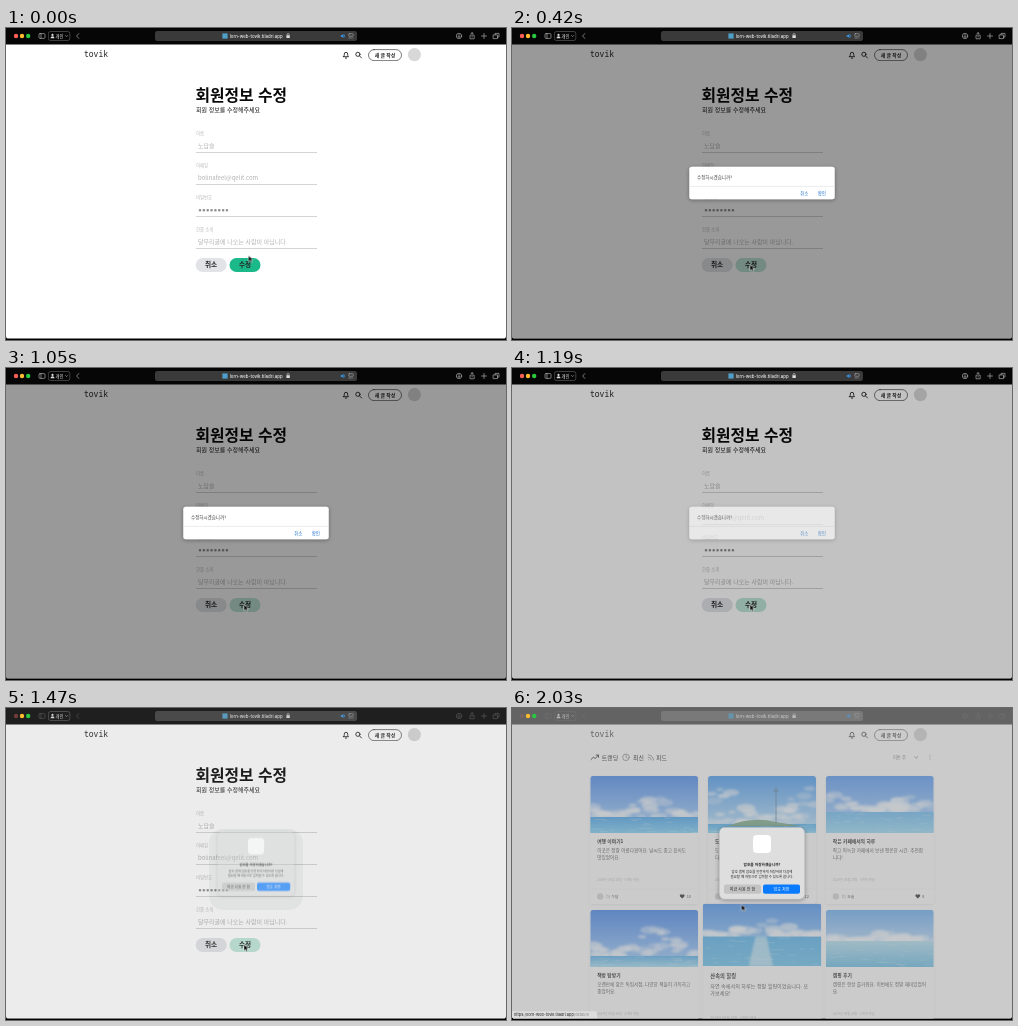
Write an HTML page that moves like this. It is 500 by 312 pixels and loops after 2100 ms.

```html
<!DOCTYPE html>
<html lang="ko">
<head>
<meta charset="utf-8">
<title>회원정보 수정</title>
<style>
  html, body { margin: 0; width: 100%; height: 100%; overflow: hidden; background: #000; }
  svg.stage { display: block; width: 100%; height: 100%; }
  text { font-family: "Noto Sans CJK KR", "Noto Sans CJK", "Noto Sans", sans-serif; fill: #222; white-space: pre; }
  .mid { text-anchor: middle; }
  .b { font-weight: 700; }
  .m { font-weight: 500; }
  .latin { font-family: Inter, "Noto Sans", sans-serif; }
  .logo { font: 500 8px "Noto Sans Mono", "DejaVu Sans Mono", monospace; }
  .label text { font-size: 4.4px; fill: #b9b9b9; }
  .value text { font-size: 6px; fill: #b0b0b0; }
  .line { fill: none; stroke-linecap: round; stroke-linejoin: round; }

  /* 30 ticks of 70 ms; each change sits just before its tick */
  .anim { animation: 2100ms step-end infinite; }
  #cursor { animation-name: cursor; }
  #save { animation-name: hover; }
  #dim { animation-name: dim; }
  #alert { animation-name: alert; }
  #header { animation-name: header; }
  #form { animation-name: form; }
  #feed { animation-name: feed; }
  #lifted { animation-name: lift; transform-origin: 250px 266px; }
  #bar { animation-name: bar; }
  #veil { animation-name: veil; }
  .idle { animation-name: idle; }
  #sheet { animation-name: sheet; transform-origin: 250px 157px; }
  #plate { animation-name: plate; }
  #ghost { animation-name: ghost; }
  #status { animation-name: status; }

  @keyframes cursor {
    0% { transform: translate(242.5px, 227.5px); }
    3.3% { transform: translate(240px, 232.5px); }
    6.6% { transform: translate(238px, 236.5px); }
    83.3% { transform: translate(238px, 236.5px); animation-timing-function: steps(5, start); }
    100% { transform: translate(229.5px, 196.5px); }
  }
  @keyframes hover {
    0% { fill: #1bb889; }
    3.3% { fill: #6dcfb1; }
    6.6%, 100% { fill: #bfe6d8; }
  }
  @keyframes dim {
    0% { opacity: 0; }
    13.3% { opacity: .13; }
    16.6% { opacity: .3; }
    19.9% { opacity: .4; }
    56.6% { opacity: .24; }
    59.9% { opacity: .08; }
    63.3%, 100% { opacity: 0; }
  }
  @keyframes alert {
    0% { opacity: 0; }
    13.3% { opacity: .3; }
    16.6% { opacity: .75; }
    19.9% { opacity: 1; }
    56.6% { opacity: .62; }
    59.9% { opacity: .2; }
    63.3%, 100% { opacity: 0; }
  }
  @keyframes header { 0% { opacity: 1; } 73.3%, 100% { opacity: .8; } }
  @keyframes form { 0% { opacity: 1; } 73.3%, 100% { opacity: 0; } }
  @keyframes feed { 0% { opacity: 0; } 73.3%, 100% { opacity: 1; } }
  @keyframes lift {
    0% { transform: none; }
    73.3% { transform: scale(1.05); }
    76.6%, 100% { transform: scale(1.1); }
  }
  @keyframes bar {
    0% { fill: #060606; }
    69.9% { fill: #0c0c0c; }
    73.3% { fill: #2c2c2c; }
    76.6%, 100% { fill: #4b4b4b; }
  }
  @keyframes veil {
    0% { opacity: 0; }
    66.6% { opacity: .06; }
    69.9% { opacity: .155; }
    73.3% { opacity: .32; }
    76.6%, 100% { opacity: .42; }
  }
  @keyframes idle {
    0% { opacity: 1; }
    66.6% { opacity: .7; }
    69.9% { opacity: .4; }
    73.3% { opacity: .3; }
    76.6%, 100% { opacity: .2; }
  }
  @keyframes sheet {
    0% { opacity: 0; transform: scale(.85); }
    69.9% { opacity: .65; transform: scale(.9); }
    73.3% { opacity: .9; transform: scale(.97); }
    76.6%, 100% { opacity: 1; transform: none; }
  }
  @keyframes plate {
    0% { opacity: .5; }
    73.3% { opacity: .9; }
    76.6%, 100% { opacity: 1; }
  }
  @keyframes ghost {
    0% { opacity: 0; }
    69.9% { opacity: .06; }
    73.3%, 100% { opacity: 0; }
  }
  @keyframes status { 0% { opacity: 0; } 86.6%, 100% { opacity: 1; } }
</style>
</head>
<body>
<svg class="stage" viewBox="0 0 500 312">
  <defs>
    <clipPath id="window"><path d="M0 0H500V308a2.600 2.600 0 0 1-2.600 2.600H2.600a2.600 2.600 0 0 1-2.600-2.600z"/></clipPath>
    <clipPath id="photo"><path d="M0 57V3a3 3 0 0 1 3-3H105a3 3 0 0 1 3 3V57z"/></clipPath>
    <filter id="soft" x="-20%" y="-20%" width="140%" height="150%">
      <feDropShadow dx="0" dy="1" stdDeviation="2" flood-opacity=".35"/>
    </filter>
    <filter id="faint" x="-10%" y="-10%" width="120%" height="120%">
      <feDropShadow dx="0" dy=".6" stdDeviation="1" flood-opacity=".1"/>
    </filter>
    <filter id="haze"><feGaussianBlur stdDeviation=".9"/></filter>
  </defs>

  <rect width="500" height="312"/>

  <g clip-path="url(#window)">
    <rect width="500" height="311" fill="#fff"/>

    <g id="header" class="anim">
      <text class="logo" x="78" y="29.2">tovik</text>
      <g class="line" stroke="#222" stroke-width=".9">
        <path d="M337.5 28.7h5c-.8-.8-.8-1.6-.8-2.7a1.7 1.7 0 0 0-3.4 0c0 1.1 0 1.9-.8 2.7zM339.4 30.1h1.2"/>
        <circle cx="351.9" cy="26.3" r="2.1"/>
        <path d="M353.5 27.9l2 2"/>
        <rect x="362.5" y="21.6" width="33" height="11" rx="5.5" stroke-width=".6"/>
      </g>
      <text class="b mid" x="379" y="28.9" font-size="4.9">새 글 작성</text>
    </g>
    <circle cx="408.4" cy="26.6" r="6.6" fill="#d8d8d8"/>

    <g id="form" class="anim">
      <text class="b" x="189.5" y="72.7" font-size="15.8" style="fill:#080808">회원정보 수정</text>
      <text class="m" x="190" y="84.2" font-size="6" style="fill:#111">회원 정보를 수정해주세요</text>
      <g class="label">
        <text x="190" y="107">이름</text>
        <text x="190" y="139">이메일</text>
        <text x="190" y="171">비밀번호</text>
        <text x="190" y="203">한줄 소개</text>
      </g>
      <g class="value">
        <text x="192" y="120.2">노담슬</text>
        <text x="192" y="152.2">bolinafeel@qelit.com</text>
        <text x="192" y="215.8">달무리골에 나오는 사람이 아닙니다.</text>
      </g>
      <path d="M194 182.2h28" stroke="#8f8f8f" stroke-width="2.6" stroke-linecap="round" stroke-dasharray="0 3.85"/>
      <path d="M190 124.5h121M190 156.5h121M190 188.5h121M190 220.5h121" stroke="#c2c2c2" stroke-width=".7"/>
      <rect x="189.7" y="230" width="31" height="14" rx="7" fill="#e1e3e7"/>
      <rect id="save" class="anim" x="223.5" y="230" width="31" height="14" rx="7"/>
      <text class="b mid" x="205" y="239.4" font-size="6.6">취소</text>
      <text class="b mid" x="239" y="239.4" font-size="6.6">수정</text>
    </g>

    <g id="feed" class="anim">
      <g class="line" stroke="#333" stroke-width=".9">
        <path d="M79 51.5l2.5-2.5 1.6 1.6 3.3-3.5M84.2 47h2.3v2.3"/>
        <g stroke="#777" stroke-width=".7">
          <circle cx="114" cy="49.3" r="3.3"/>
          <path d="M114 47.3v2l1.2.9"/>
          <path d="M136.3 49a3 3 0 0 1 3 3M136.3 46.8a5.2 5.2 0 0 1 5.2 5.2M136.5 51.8h.1"/>
          <path d="M402.7 48.7l1.5 1.5 1.5-1.5"/>
        </g>
        <path d="M418 47.3v.01M418 49.3v.01M418 51.3v.01" stroke="#999"/>
      </g>
      <g font-size="5.9">
        <text class="m" x="89.8" y="51.5">트렌딩</text>
        <text x="121" y="51.5">최신</text>
        <text x="144" y="51.5">피드</text>
      </g>
      <text x="381" y="50.9" font-size="4.2" style="fill:#888">이번 주</text>
      <g id="cards"></g>
    </g>

    <rect id="dim" class="anim" width="500" height="311"/>
    <g id="alert" class="anim">
      <rect x="177.3" y="138.8" width="145.4" height="32.4" rx="2.5" fill="#fff" filter="url(#soft)"/>
      <path d="M177.3 158.4h145.4" stroke="#ddd" stroke-width=".6"/>
      <text x="185" y="150.9" font-size="4.5" style="fill:#444">수정하시겠습니까?</text>
      <g class="mid m" font-size="4.5">
        <text x="292.3" y="166.7" style="fill:#2a78d0">취소</text>
        <text x="309.8" y="166.7" style="fill:#1468cc">확인</text>
      </g>
    </g>

    <g id="toolbar">
      <rect id="bar" class="anim" width="500" height="16.5"/>
      <circle class="anim idle" cx="10" cy="8" r="2.2" fill="#fe5f57"/>
      <g class="line anim idle" stroke="#aaa" stroke-width=".7">
        <rect x="33" y="5.6" width="6" height="4.8" rx="1"/>
        <path d="M35 5.6v4.8M72.8 5.6l-2.2 2.4 2.2 2.4"/>
      </g>
      <rect x="42.4" y="3.5" width="21.4" height="9" rx="2" fill="none" stroke="#666" stroke-width=".6"/>
      <circle cx="46.5" cy="6.9" r="1.1" fill="#ddd"/>
      <path d="M44.5 10.2a2 2 0 0 1 4 0z" fill="#ddd"/>
      <text class="m" x="49.6" y="9.6" font-size="4.3" style="fill:#eee">개인</text>
      <path class="line" d="M59.5 7.5l1.1 1.1 1.1-1.1" stroke="#bbb" stroke-width=".6"/>

      <rect x="149" y="3" width="202" height="10" rx="2.5" fill="#fff" opacity=".21"/>
      <rect x="216.4" y="5.4" width="5.2" height="5.2" fill="#4f9fc8"/>
      <text class="latin m" x="223.7" y="9.6" font-size="4.35" style="fill:#f2f2f2">lorn-web-tovik.tiladri.app</text>
      <rect x="280.4" y="7.3" width="3.4" height="2.8" rx=".5" fill="#ddd"/>
      <path class="line" d="M281.1 7.3v-.8a1 1 0 0 1 2 0v.8" stroke="#ddd" stroke-width=".6"/>
      <path d="M334.7 7.2h1.2l1.5-1.3v4.2l-1.5-1.3h-1.2z" fill="#3b9cf0"/>
      <path class="line" d="M338.3 6.7a1.8 1.8 0 0 1 0 2.6" stroke="#3b9cf0" stroke-width=".6"/>
      <g class="line" stroke="#aaa" stroke-width=".6">
        <rect x="342.8" y="5.7" width="4.4" height="2.6" rx=".5"/>
        <path d="M342.9 10h2.5M346.7 10h.3"/>
      </g>
      <g class="line anim idle" stroke="#aaa" stroke-width=".7">
        <circle cx="453" cy="8" r="2.7"/>
        <path d="M453 6.5v2.8M452 8.4l1 1 1-1"/>
        <path d="M464.9 7.2h-.9v3.6h4.2V7.2h-.9M466.1 9V4.7M465 5.7l1.1-1.1 1.1 1.1"/>
        <path d="M475.5 8h5M478 5.5v5"/>
        <path d="M487.5 6.9h4v3.7h-4zM489 6.9V5.4h4v3.7h-1.5"/>
      </g>
    </g>

    <rect id="veil" class="anim" width="500" height="311" fill="#848484"/>
    <circle cx="16" cy="8" r="2.2" fill="#febc2e"/>
    <circle cx="22.2" cy="8" r="2.2" fill="#28c840"/>

    <g id="status" class="anim">
      <path d="M0 303.2H83a2 2 0 0 1 2 2V311H0z" fill="#dcdcdc"/>
      <text class="latin" x="2" y="308.4" font-size="3.9">https://lorn-web-tovik.tiladri.app<tspan fill="#888">/detail/8</tspan></text>
    </g>
  </g>

  <rect id="ghost" class="anim" x="203" y="121" width="94" height="81" rx="14" fill="#4a5a5a"/>
  <g id="sheet" class="anim">
    <rect id="plate" class="anim" x="207.5" y="119.5" width="85" height="71.5" rx="5" fill="#dedede" stroke="#bbb" stroke-width=".3" filter="url(#soft)"/>
    <rect x="241" y="127" width="18" height="18" rx="4" fill="#fff"/>
    <text class="b mid" x="250" y="157.6" font-size="3.7">암호를 저장하겠습니까?</text>
    <g class="mid" font-size="3.4">
      <text x="250" y="164.8">암호 앱에 암호를 안전하게 저장하여 다음에</text>
      <text x="250" y="169.8">필요할 때 자동으로 입력할 수 있도록 합니다.</text>
    </g>
    <rect x="212" y="176.5" width="37" height="9.2" rx="2" fill="#c3c3c3"/>
    <rect x="251" y="176.5" width="37" height="9.2" rx="2" fill="#0a7bff"/>
    <g class="mid m" font-size="4">
      <text x="230.5" y="182.6">지금 사용 안 함</text>
      <text x="269.5" y="182.6" style="fill:#fff">암호 저장</text>
    </g>
  </g>

  <path id="cursor" class="anim" d="M0 0V6.2l1.5-1.3 1 2.2 1.1-.5-1-2.1h2z" stroke="#fff" stroke-width=".5"/>
</svg>

<script>
  const posts = [
    { title: "여행 이야기1", lines: ["이곳은 정말 아름다웠어요. 날씨도 좋고 음식도", "맛있었어요."],
      by: "누담", likes: 10, sky: ["#4a8cf0", "#b4dcff"], sea: ["#4aa6ee", "#7fd2fa"], shore: 41, bank: 22, extra: "" },
    { title: "도시의 하루", lines: ["도심 골목을 천천히 걸으며 사진을 남겼어요.", "다시 가고 싶어요."],
      by: "마온", likes: 12, sky: ["#4a9cf2", "#c4e8ff"], sea: ["#55b4f0", "#8ad6f8"], shore: 48, bank: 38,
      extra: '<path d="M20 50q24-10 48-4l24 4z" fill="#7fae8c"/><path d="M68 47V11M65 15h6" stroke="#5d7686" stroke-width=".7"/>' },
    { title: "작은 카페에서의 하루", lines: ["작고 아늑한 카페에서 보낸 평온한 시간. 추천합", "니다!"],
      by: "오슬", likes: 8, sky: ["#5a9cf4", "#b8dcff"], sea: ["#70bdf4", "#9adcf8"], shore: 36, bank: 20, extra: "" },
    { title: "책방 탐방기", lines: ["오랜만에 찾은 독립서점, 다양한 책들이 가득하고", "좋았어요."],
      by: "다울", likes: 7, sky: ["#4688ee", "#a8d4ff"], sea: ["#5cb2ee", "#a4e0f6"], shore: 46, bank: 28, extra: "" },
    { title: "산속의 힐링", lines: ["자연 속에서의 하루는 정말 힐링이었습니다. 또", "가보세요!"],
      by: "루온", likes: 9, sky: ["#4e96f0", "#b4e0ff"], sea: ["#58b4ee", "#6cc4ee"], shore: 30, bank: 16,
      extra: '<path d="M48 30h10l6 27H42z" fill="#e6f9ff" opacity=".6" filter="url(#haze)"/>' },
    { title: "캠핑 후기", lines: ["캠핑은 항상 즐거워요. 이번에도 정말 재미있었어", "요."],
      by: "해린", likes: 6, sky: ["#6cb0f4", "#f0f8ff"], sea: ["#b4e2f4", "#6cc0e8"], shore: 31, bank: 9, extra: "" }
  ];

  const random = seed => () => (seed = seed * 16807 % 2147483647) / 2147483647;

  const gradient = (id, [from, to]) =>
    `<linearGradient id="${id}" x2="0" y2="1"><stop stop-color="${from}"/><stop offset="1" stop-color="${to}"/></linearGradient>`;

  function clouds(rand, shore, bank) {
    let out = "";
    for (let i = 0; i < 44; i++) {
      const x = rand() * 108;
      const rise = bank * (.6 + .4 * Math.sin(x / 13 + bank));
      const y = shore - rand() * rise;
      const r = 1.5 + rand() * 2.5;
      out += `<ellipse cx="${x.toFixed(1)}" cy="${y.toFixed(1)}" rx="${(r * 2.4).toFixed(1)}" ry="${r.toFixed(1)}" opacity="${(.3 + rand() * .4).toFixed(2)}"/>`;
    }
    return `<g fill="#f4faff" filter="url(#haze)">${out}</g>`;
  }

  function waves(rand, shore) {
    let d = "";
    for (let i = 0; i < 22; i++) {
      d += `M${(rand() * 104).toFixed(1)} ${(shore + 1 + rand() * (56 - shore)).toFixed(1)}h${(3 + rand() * 8).toFixed(1)}`;
    }
    return `<path d="${d}" stroke="#d8f2fc" stroke-width=".5" opacity=".5"/>`;
  }

  function photo(p, i) {
    const rand = random(977 * (i + 3));
    return `${gradient("sky" + i, p.sky)}${gradient("sea" + i, p.sea)}
      <g clip-path="url(#photo)">
        <rect width="108" height="57" fill="url(#sky${i})"/>
        ${clouds(rand, p.shore, p.bank)}
        <rect y="${p.shore}" width="108" height="${57 - p.shore}" fill="url(#sea${i})"/>
        ${waves(rand, p.shore)}${p.extra}
      </g>`;
  }

  function card(p, i) {
    const x = 78.2 + i % 3 * 117.8;
    const y = i < 3 ? 68 : 202;
    const text = (tx, ty, size, color, str, cls = "") =>
      `<text class="${cls}" x="${tx}" y="${ty}" font-size="${size}" style="fill:${color}">${str}</text>`;
    const body = p.lines.map((s, n) => text(7, 76.3 + n * 6.8, 4.65, "#555", s)).join("");
    return `<g ${i === 4 ? 'id="lifted" class="anim"' : ""}><g transform="translate(${x} ${y})">
      <rect width="108" height="128" rx="3" fill="#fff" filter="url(#faint)"/>
      ${photo(p, i)}
      ${text(7, 67.4, 4.8, "#222", p.title, "b")}
      ${body}
      ${text(7, 105, 3.2, "#bbb", "2024년 08월 28일 · 0개의 댓글")}
      <path d="M0 113h108" stroke="#eee" stroke-width=".5"/>
      <circle cx="10" cy="120.4" r="3.2" fill="#d6d6d6"/>
      ${text(16, 121.8, 3.8, "#aaa", `by <tspan fill="#444">${p.by}</tspan>`)}
      <path d="M92 122.5l-2.1-2.1a1.25 1.25 0 0 1 2.1-1.5 1.25 1.25 0 0 1 2.1 1.5z" fill="#333"/>
      ${text(96.5, 121.9, 3.9, "#444", p.likes)}
    </g></g>`;
  }

  // The lifted card goes last so that it lies on top
  const order = [0, 1, 2, 3, 5, 4];
  document.getElementById("cards").innerHTML = order.map(i => card(posts[i], i)).join("");
</script>
</body>
</html>
```
